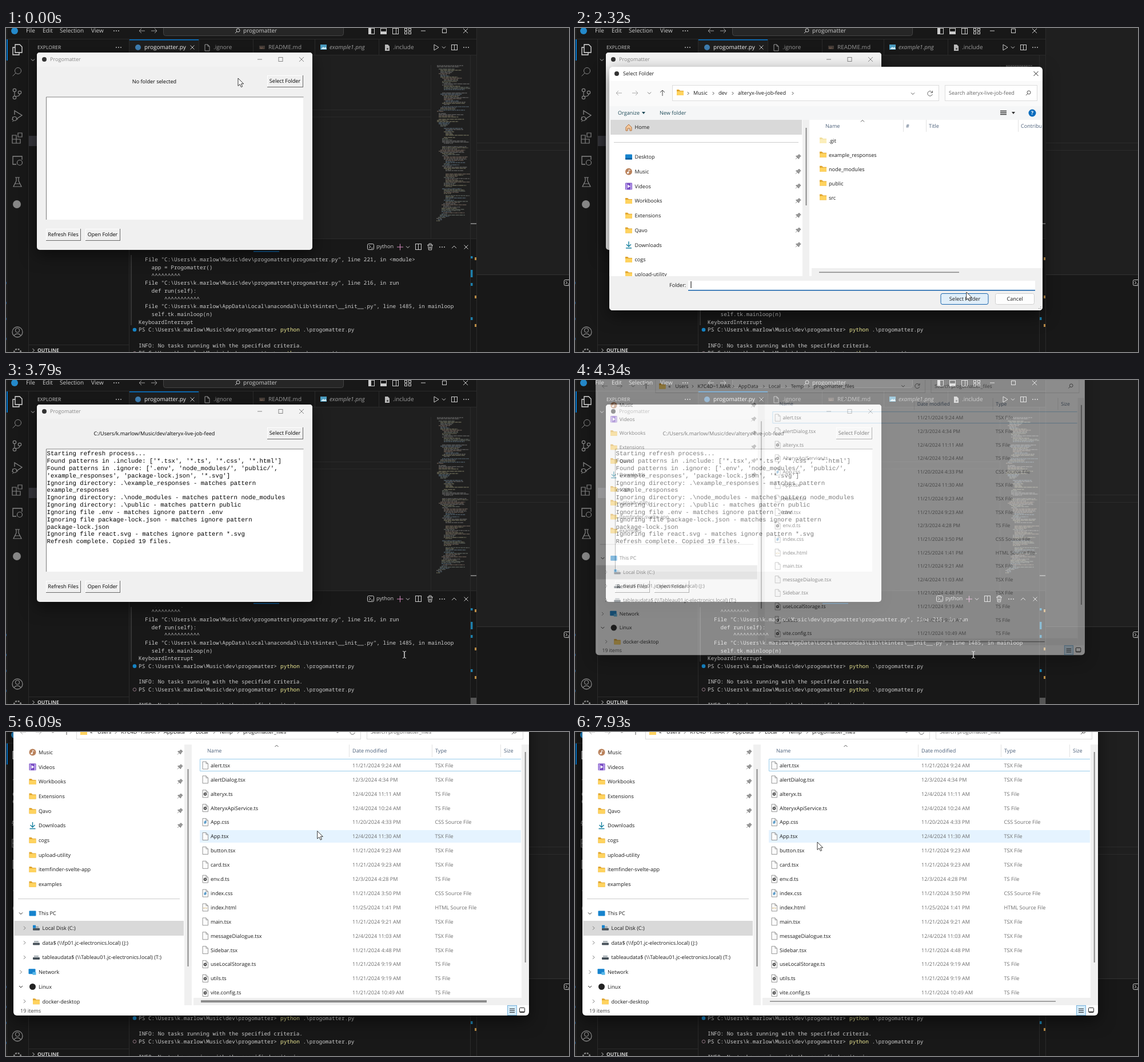
Animation, 985 px wide and 568 px high, one loop 8 s. Source, as an HTML page:

```html
<!DOCTYPE html>
<html lang="en">
<head>
<meta charset="utf-8">
<title>Progomatter</title>
<style>
html, body { margin: 0; width: 100%; height: 100%; overflow: hidden; background: #181818; }
svg { display: block; width: 985px; height: 568px; font: 9.1px "Open Sans", "Noto Sans", sans-serif; }
text { white-space: pre; text-rendering: geometricPrecision; }
.code { font-size: 10px; }
.term { font: 9.39px "Noto Sans Mono", monospace; }
.log { font: 10.7px "Liberation Mono", monospace; }
.shadow { filter: drop-shadow(0 9px 14px rgba(0, 0, 0, .5)); }
</style>
</head>
<body>
<svg id="stage" viewBox="0 0 985 568"></svg>
<script>
const stage = document.getElementById('stage');

// ---------- drawing helpers ----------
const esc = s => s.replace(/&/g, '&amp;').replace(/</g, '&lt;');
const rect = (x, y, w, h, fill, more = '') =>
  `<rect x="${x}" y="${y}" width="${w}" height="${h}" fill="${fill}" ${more}/>`;
const text = (x, y, s, fill = '#1b1b1b', more = '') =>
  `<text x="${x}" y="${y + 3.3}" fill="${fill}" ${more}>${esc(s)}</text>`;
const path = (d, stroke, width = 1, fill = 'none') =>
  `<path d="${d}" stroke="${stroke}" stroke-width="${width}" fill="${fill}"/>`;
const circle = (x, y, r, fill, more = '') => `<circle cx="${x}" cy="${y}" r="${r}" fill="${fill}" ${more}/>`;
const group = (id, body, more = '') => `<g id="${id}" ${more}>${body}</g>`;
const box = (x, y, w, h, stroke, fill = 'none', r = 0) =>
  rect(x + .5, y + .5, w - 1, h - 1, fill, `stroke="${stroke}" rx="${r}"`);
const middle = 'text-anchor="middle"';

const chevrons = { right: [-1.5, -3, 3, 3, -3, 3], down: [-3, -1.5, 3, 3, 3, -3], up: [-3, 1.5, 3, -3, 3, 3] };
const chevron = (x, y, dir, color = '#555', k = 1) => {
  const [a, b, c, d, e, f] = chevrons[dir].map(v => v * k);
  return path(`M${x + a} ${y + b}l${c} ${d}l${e} ${f}`, color);
};
const cross = (x, y, color, r = 4) => path(`M${x - r} ${y - r}l${2 * r} ${2 * r}m0 ${-2 * r}l${-2 * r} ${2 * r}`, color);
const dots = (x, y, color) => [-4, 0, 4].map(d => circle(x + d, y, .9, color)).join('');
const lens = (x, y, color, r = 3) =>
  circle(x + 1, y - 1, r, 'none', `stroke="${color}"`) + path(`M${x + 1 - r * .7} ${y - 1 + r * .7}l${-r} ${r}`, color);
const arrow = (x, y, angle, color) =>
  `<g transform="translate(${x} ${y}) rotate(${angle})">${path('M5 0H-5M-1 -4L-5 0L-1 4', color)}</g>`;
const windowButtons = (x, y, gap, color) =>
  path(`M${x - 4} ${y}h8`, color) + box(x + gap - 4, y - 4, 8, 8, color) + cross(x + 2 * gap, y, color);
const refresh = (x, y) => path(`M${x + 4} ${y - 2}A4.3 4.3 0 1 0 ${x + 4.3} ${y + 1}M${x + 4.5} ${y - 5}v3.4h-3.4`, '#666');
const pin = (x, y) => path(`M${x - 4} ${y + 4}l3 -3m-2.5 -2.5l5 5l1 -2.5l2.5 -2.5l-3 -3l-2.5 2.5z`, '#777', .8, '#999');
const folder = (x, y, pale) =>
  path(`M${x - 6} ${y + 5}v-10h4l2 2h6v8z`, 'none', 0, pale ? '#f1dfa0' : '#e0a52f') +
  rect(x - 6, y - 2, 12, 7, pale ? '#fbeebb' : '#ffd35f', 'rx="1"');
const screen = (x, y) => rect(x - 6, y - 4.5, 12, 9, '#1683cd', 'rx="1"');
const drive = (x, y) => rect(x - 6, y, 12, 4, '#48525a', 'rx="1"') + rect(x - 4, y - 3, 8, 2, '#9aa4aa');

const placeIcons = {
  Desktop: (x, y) => screen(x, y) + rect(x - 6, y + 2, 12, 2.5, '#0b5c9c'),
  Music: (x, y) => circle(x, y, 6, '#b9825c') + circle(x - 1.5, y + 2, 1.7, '#fff') + path(`M${x} ${y + 2}v-5l3 1`, '#fff'),
  Videos: (x, y) => rect(x - 6, y - 6, 12, 12, '#7a4fc4', 'rx="1"') +
    path(`M${x - 4} ${y - 5}v11M${x + 4} ${y - 5}v11`, '#d9c8ff', 1.4) + path(`M${x - 2} ${y - 3}l5 3l-5 3z`, 'none', 0, '#fff'),
  Downloads: (x, y) => path(`M${x} ${y - 6}v9m-4 -4l4 4l4 -4M${x - 5} ${y + 5.5}h10`, '#16809f', 1.4),
};
const places = (names, x, top, pinX, pinned) => names.map((name, i) => {
  const y = top + 25.7 * i;
  return (placeIcons[name] || folder)(x, y) + text(x + 10.5, y, name) + (i < pinned ? pin(pinX, y) : '');
}).join('');
const quickAccess = ['Desktop', 'Music', 'Videos', 'Workbooks', 'Extensions', 'Qavo', 'Downloads', 'cogs',
  'upload-utility', 'itemfinder-svelte-app', 'examples'];

// ---------- code editor in the background ----------
let seed = 7;
const random = () => (seed = (seed * 16807) % 2147483647) / 2147483647;

function minimap() {
  const colors = ['#8e9a8e', '#7f9bb0', '#a58f80', '#9a9a9a', '#b0ad8a'];
  let out = '', depth = 0;
  for (let i = 0; i < 137; i++) {
    depth = Math.max(0, Math.min(5, depth + Math.round(random() * 2.4 - 1.2)));
    const x = (i > 120 ? 750 : 754) + depth * 3;
    const width = Math.min(812 - x, (i > 120 ? 5 : 9) + random() * 40);
    const dash = `stroke-dasharray="${2 + random() * 5 | 0} .8 ${2 + random() * 8 | 0} 1" opacity=".7"`;
    const color = colors[random() * 5 | 0];
    if (random() > .1) out += `<path d="M${x} ${66 + 2 * i}h${width}" stroke="${color}" ${dash}/>`;
  }
  return out;
}

function activityBar() {
  const g = '#868686';
  return path('M16 29h8l4 4v10h-12zM16 34h-4v13h11v-4', '#e0e0e0', 1.3) +
    lens(20, 76, g, 5.5) +
    [[15, 109], [15, 122], [24, 113]].map(([x, y]) => circle(x, y, 2.7, 'none', `stroke="${g}" stroke-width="1.2"`)).join('') +
    path('M15 112v7M24 116q0 4 -8 4', g, 1.2) +
    path('M15 152v-7l13 8l-9 6', g, 1.3) + circle(15, 159, 3.5, 'none', `stroke="${g}" stroke-width="1.2"`) +
    path('M11 156l2 1m-3 3h2m-1 4l2 -1M19 160h2', g) +
    path('M11 188h7v14h-7zm0 7h14v7h-14M21 184h7v7h-7z', g, 1.2) +
    path('M18 239h-6v-14h16v6M14 239h4', g, 1.3) + circle(24, 236, 4.5, 'none', `stroke="${g}" stroke-width="1.2"`) +
    path('M16 262h8m-6 0v6l-5 10h14l-5 -10v-6M15 273h10', g, 1.2) +
    circle(19, 309, 7, g) +
    circle(20, 533, 9, 'none', `stroke="${g}" stroke-width="1.3"`) + circle(20, 530, 3.5, 'none', `stroke="${g}" stroke-width="1.2"`) +
    path('M14 539q6 -6 12 0', g, 1.2) +
    circle(20, 569, 6, 'none', `stroke="${g}" stroke-width="2.5" stroke-dasharray="3 1.7"`);
}

function editor() {
  const light = '#cccccc', dim = '#9d9d9d', edge = '#2b2b2b';
  const prompt = 'PS C:\\Users\\k.marlow\\Music\\dev\\progomatter> ';
  const script = '  File "C:\\Users\\k.marlow\\Music\\dev\\progomatter\\progomatter.py", line ';
  const info = 'INFO: No tasks running with the specified criteria.';
  const lines = [script + '221, in <module>', '    app = Progomatter()', '    ^^^^^^^^^', script + '216, in run',
    '    def run(self):', '        ^^^^^^^^^^^',
    '  File "C:\\Users\\k.marlow\\AppData\\Local\\anaconda3\\Lib\\tkinter\\__init__.py", line 1485, in mainloop',
    '    self.tk.mainloop(n)', 'KeyboardInterrupt', prompt, '', info, prompt, '', info];
  const terminal = lines.map((s, i) => {
    const y = 406 + 13.68 * i;
    return text(232, y, s, light) + (s === prompt ? text(480, y, 'python', '#f0ec96') + text(519.4, y, '.\\progomatter.py', light) : '');
  }).join('') + circle(225, 529, 3.3, '#1583c4') + circle(225, 570, 2.8, 'none', 'stroke="#8d7480"') + rect(218.5, 390, 1, 131, '#555');

  const tab = (x, name, color, more) => text(x, 34, name, color, more);
  return rect(0, 0, 985, 568, '#181818') +
    rect(824, 0, 161, 432, '#1f1f1f') + path('M824 201.5h161M824 214.5h161', '#2b2b2b') + path('M824 432.5h161', '#333') +
    box(976, 441, 12, 11, light, 'none', 2) + path('M979 444l3 2.5l-3 2.5M983 449h3', light) +
    [447, 482, 510, 545].map(y => rect(0, y - 2, 1, 4, '#174a80')).join('') +
    rect(216, 47, 607, 322, '#1f1f1f') + path('M216 143.5h527M216 156h527', '#2a2a2a') + rect(743, 65, 1, 304, '#292929') +
    path('M0 19.5h823M39.5 20v548M215.5 20v548M216 47.5h607M216 369.5h607M1.5 0v568M823.5 0v568M812.5 47v521', edge) +
    rect(1, 20, 2, 37, '#0078d4') + activityBar() + minimap() + rect(813, 342, 10, 2, '#777') +
    `<g class="code">` + circle(15, 5, 6, '#2489ca') +
    text(35, 5, 'File', light) + text(64, 5, 'Edit', light) + text(94, 5, 'Selection', light) + text(149, 5, 'View', light) +
    dots(193, 5, light) + arrow(238, 5, 0, dim) + arrow(259, 5, 180, dim) +
    box(275, -12, 316, 26, '#444', '#262626', 4) + lens(405, 5, light) + text(415, 5, 'progomatter', light) +
    box(634, 0, 11, 11, light) + rect(634, 0, 5, 11, light) + box(655, 0, 11, 11, light) + rect(655, 6, 11, 5, light) +
    box(676, 0, 11, 11, light) + path('M682.5 0v11', light) +
    [[697, 0], [704, 0], [697, 6], [704, 6]].map(([x, y]) => box(x, y, 5, 5, light)).join('') +
    windowButtons(730, 5, 37, light) +
    rect(216, 20, 121, 28, '#1f1f1f') + rect(216, 20, 121, 1.5, '#0078d4') +
    path('M337.5 20v27M432.5 20v27M540.5 20v27M652.5 20v27', edge) +
    circle(231, 34, 5, '#3f80b5') + tab(242, 'progomatter.py', '#fff') + cross(326, 34, light, 3.5) +
    path('M348 29h5l3 3v8h-8zM353 29v3h3', dim) + tab(363, '.ignore', dim) +
    rect(443, 31, 10, 6, '#443c37') + text(448, 34, 'M↓', '#a07b67', `${middle} font-size="5"`) + tab(459, 'README.md', dim) +
    rect(550, 29, 11, 9, '#4b9cc0') + path('M551 37l4 -4l2 2l2 -2l2 4z', 'none', 0, '#d9eef5') +
    tab(566, 'example1.png', dim, 'font-style="italic"') +
    path('M663 29h5l3 3v8h-8z', 'none', 0, '#b9b9b9') + rect(666, 35, 3, 3, '#555') + tab(677, '.include', dim) +
    path('M749 29l8 5l-8 5z', light) + chevron(766, 34, 'down', light) + box(779, 29, 11, 10, light) + path('M784.5 29v10', light) + dots(805, 34, light) +
    text(55, 34, 'EXPLORER', light, 'font-size="8.6"') + dots(197, 34, light) + chevron(47, 56, 'down', light) +
    rect(40, 189, 14, 18, '#37373d') + path('M40 555.5h176', edge) + chevron(48, 565, 'right', light) +
    text(55, 565, 'OUTLINE', light, 'font-size="8.6" font-weight="700"') +
    box(632, 378, 12, 11, light, 'none', 2) + path('M635 381l3 2.5l-3 2.5M639 386h3', light) +
    text(648, 383, 'python', light, 'font-size="9.2"') + path('M684 384h11M689.5 378.5v11', '#d68ac0') + chevron(703, 384, 'down', light) +
    box(716, 378, 11, 11, light) + path('M721.5 378v11', light) + path('M737 380.5h10M740 380v-2h4v2M738.5 381l1 8h5l1 -8M741 383v4M743 383v4', light) +
    dots(763, 384, light) + chevron(784, 384, 'up', light, 1.3) + cross(805, 384, light, 3.5) + rect(433, 391, 45, 1.5, '#0f6cb5') + '</g>' +
    `<clipPath id="termClip">${rect(216, 398, 597, 170, '#000')}</clipPath><g clip-path="url(#termClip)">` +
    group('terminal', terminal, 'class="term"') + '</g>' +
    [[400, 4], [424, 13], [447, 5], [507, 5]].map(([y, h]) => rect(813, y, 3.5, h, '#1d7fab')).join('') +
    [402, 469, 519].map(y => rect(820, y, 3, 5, '#b98a45')).join('') + rect(813, 557, 10, 11, '#555', 'id="slider"');
}

// ---------- application window ----------
function appWindow() {
  const button = (x, y, w, label) => rect(x, y, w, 21, '#696969') + rect(x, y, w - 1, 20, '#fff') +
    rect(x + 1, y + 1, w - 2, 19, '#f0f0f0') + text(x + w / 2 - .5, y + 10, label, '#000', middle);
  const log = ['Starting refresh process...', "Found patterns in .include: ['*.tsx', '*.ts', '*.css', '*.html']",
    "Found patterns in .ignore: ['.env', 'node_modules/', 'public/',", "'example_responses', 'package-lock.json', '*.svg']",
    'Ignoring directory: .\\example_responses - matches pattern', 'example_responses',
    'Ignoring directory: .\\node_modules - matches pattern node_modules', 'Ignoring directory: .\\public - matches pattern public',
    'Ignoring file .env - matches ignore pattern .env', 'Ignoring file package-lock.json - matches ignore pattern',
    'package-lock.json', 'Ignoring file react.svg - matches ignore pattern *.svg', 'Refresh complete. Copied 19 files.'];
  return rect(54, 43, 482, 346, '#f0f0f0', 'rx="5" class="shadow"') + path('M54 68v-20q0 -5 5 -5h472q5 0 5 5v20z', 'none', 0, '#f3f3f3') +
    circle(67, 55, 4, '#333') + group('appTitle', text(77, 55, 'Progomatter') + windowButtons(444, 55, 36.5, '#1b1b1b')) +
    text(259.5, 94, 'No folder selected', '#000', middle + ' id="folderLabel"') + button(457, 83, 63, 'Select Folder') +
    rect(70, 120, 450, 216, '#fff') + path('M70.5 336v-215h450', '#7a7a7a') +
    group('log', log.map((s, i) => text(71.5, 129 + 12.83 * i, s, '#000')).join(''), 'class="log"') +
    button(70, 352, 61, 'Refresh Files') + button(139, 352, 61, 'Open Folder');
}

// ---------- folder picker ----------
function dialog() {
  const files = ['.git', 'example_responses', 'node_modules', 'public', 'src'];
  const crumbs = [[207, 'Music'], [251, 'dev'], [285, 'alteryx-live-job-feed']];
  return rect(60, 68, 758, 427, '#fff', 'rx="6" class="shadow"') + rect(60, 93, 758, 44, '#fafafa') + rect(60, 137, 758, 24, '#f5f6f7') +
    circle(73, 80, 4, '#333') + text(84, 80, 'Select Folder') + cross(806.5, 80, '#222') +
    arrow(77, 114, 0, '#aaa') + arrow(105, 114, 180, '#aaa') + chevron(130, 114, 'down', '#777') + arrow(153, 114, 90, '#444') +
    box(170, 100, 467, 28, '#dcdcdc', '#fff') + folder(184, 113) + [198, 242, 276, 381].map(x => chevron(x, 114.5, 'right', '#444', .8)).join('') +
    crumbs.map(([x, s]) => text(x, 114, s)).join('') + chevron(591, 115, 'down') + refresh(621, 115) +
    box(647, 100, 162, 28, '#dcdcdc', '#fff') + text(654, 114, 'Search alteryx-live-job-feed', '#666') + lens(793, 114, '#555') +
    text(75, 149, 'Organize', '#1e4a58') + path('M117 147h6l-3 4z', 'none', 0, '#1e4a58') + text(148, 149, 'New folder', '#1e4a58') +
    path('M744 145.5h11M744 148.5h11M744 151.5h11', '#333', 1.4) + path('M764 147h6l-3 4z', 'none', 0, '#333') +
    circle(800, 149, 6.5, '#0a6cbd') + text(800, 149, '?', '#fff', middle + ' font-weight="700"') +
    rect(62, 161, 335, 26, '#d9d9d9') + path('M89 174l5 -5l5 5v6h-3v-4h-4v4h-3z', '#b3703c', 1, '#f3c89c') + text(104.5, 174, 'Home') +
    path('M68 200.5h323', '#ccc') + `<clipPath id="navClip">${rect(60, 161, 340, 274, '#000')}</clipPath>` +
    `<g clip-path="url(#navClip)">${places(quickAccess.slice(0, 9), 94, 226, 390, 7)}</g>` +
    rect(398, 161, 12, 274, '#f0f0f0') + rect(403.5, 175, 2, 136, '#8a8a8a') +
    rect(421, 0, 397, 24, '#e5f3ff', 'id="pickHover"') +
    group('pickList', files.map((s, i) => folder(434, 197 + 24.85 * i, !i) + text(444, 198 + 24.85 * i, s)).join('')) +
    path('M574.5 161v21M614.5 161v21M775.5 161v21', '#e2e2e2') + chevron(503, 163, 'up') +
    [[438, 'Name'], [579, '#'], [619, 'Title'], [780, 'Contribu']].map(([x, s]) => text(x, 172, s, '#4c607a')).join('') +
    rect(414, 421, 404, 14, '#f0f0f0') + rect(427, 427.5, 245, 1.6, '#8a8a8a') +
    path('M60 435h758v54q0 6 -6 6h-746q-6 0 -6 -6z', 'none', 0, '#f0f0f0') + text(165, 451, 'Folder:') +
    rect(198, 443, 607, 17, '#fff') + rect(198, 459, 607, 1.6, '#1b66ad') + rect(202.5, 444, 1, 12, '#000', 'id="caret"') +
    rect(640, 465.5, 83, 19, '#fdfdfd', 'id="okButton" rx="3" stroke="#1b66ad"') + text(682, 475, 'Select Folder', undefined, middle) +
    box(735, 465, 69, 20, '#d0d0d0', '#fdfdfd', 3) + text(769.5, 475, 'Cancel', undefined, middle) +
    [[815, 492], [815, 489], [812, 492]].map(([x, y]) => rect(x - 1, y - 1, 1.5, 1.5, '#aaa')).join('');
}

// ---------- file explorer ----------
function explorer() {
  const files = `alert.tsx|11/21/2024 9:24 AM
alertDialog.tsx|12/3/2024 4:34 PM
alteryx.ts|12/4/2024 11:11 AM
AlteryxApiService.ts|12/4/2024 10:24 AM
App.css|11/20/2024 4:33 PM
App.tsx|12/4/2024 11:30 AM
button.tsx|11/21/2024 9:23 AM
card.tsx|11/21/2024 9:23 AM
env.d.ts|12/3/2024 4:28 PM
index.css|11/21/2024 3:50 PM
index.html|11/25/2024 1:41 PM
main.tsx|11/21/2024 9:21 AM
messageDialogue.tsx|12/4/2024 11:03 AM
Sidebar.tsx|11/21/2024 4:48 PM
useLocalStorage.ts|11/21/2024 9:19 AM
utils.ts|11/21/2024 9:19 AM
vite.config.ts|11/21/2024 10:49 AM`.split('\n');
  const types = { tsx: 'TSX File', ts: 'TS File', css: 'CSS Source File', html: 'HTML Source File' };
  const marks = { ts: y => circle(348.5, y + .5, 2.8, '#444') + circle(348.5, y + .5, 1, '#fff'),
    css: y => text(348.5, y, '#', '#2c7fb8', middle + ' font-weight="700" font-size="8"'),
    html: y => text(348.5, y, '<>', '#b98a2e', middle + ' font-size="6.5"'), tsx: () => '' };
  const rows = files.map((row, i) => {
    const [name, date] = row.split('|'), ext = name.split('.').pop(), y = 58.5 + 24.9 * i;
    return path(`M344 ${y - 6.5}h6l3.5 3.5v9.5h-9.5zM350 ${y - 6.5}v3.5h3.5`, '#8c8c8c', .9, '#fcfcfc') + marks[ext](y) +
      text(358, y, name) + text(606, y, date, '#6d6d6d') + text(750.5, y, types[ext], '#6d6d6d');
  }).join('');

  // name, depth, chevron direction, icon
  const tree = [['This PC', 0, 'down', screen], ['Local Disk (C:)', 1, 'right', (x, y) => drive(x, y) + rect(x - 6, y - 5, 5, 5, '#1683cd')],
    ['data$ (\\\\fp01.jc-electronics.local) (J:)', 1, 'right', drive], ['tableaudata$ (\\\\Tableau01.jc-electronics.local) (T:)', 1, 'right', drive],
    ['Network', 0, 'right', (x, y) => screen(x - 1, y - 1) + rect(x, y, 6, 5, '#59b7e8')],
    ['Linux', 0, 'down', (x, y) => circle(x, y, 5.5, '#222')], ['docker-desktop', 1, 'right', folder]];
  const nodes = tree.map(([name, depth, dir, icon], i) => {
    const y = 318 + 25.7 * i, x = 26 + 6.5 * depth;
    return chevron(x, y, dir, dir === 'down' ? '#222' : '#777') + icon(x + 20.5, y) + text(x + 31, y, name);
  }).join('');

  const crumbs = [[160, 'Users'], [201, 'K7C4D~1.MAR'], [276, 'AppData'], [332, 'Local'], [373, 'Temp'], [415, 'progomatter_files']];
  return rect(13, -80, 902, 577, '#fff', 'rx="6" class="shadow"') +
    arrow(30, 0, 0, '#aaa') + arrow(57, 0, 180, '#aaa') + chevron(82, 0, 'down', '#777') + arrow(106, 0, 90, '#555') +
    box(123, -15, 498, 28, '#dcdcdc', '#fff') + folder(136, 0) + text(147, 0, '«') +
    crumbs.map(([x, s], i) => text(x, 0, s) + (i ? chevron(x - 9, .5, 'right', '#555', .8) : '')).join('') +
    chevron(580, 0, 'down') + refresh(606, 0) + box(631, -15, 274, 28, '#dcdcdc', '#fff') + text(638, 0, 'Search progomatter_files', '#666') + lens(889, 0, '#555') +
    places(quickAccess.slice(1), 46.5, 35.5, 304, 6) + path('M21 292.5h283', '#ccc') + rect(14, 331, 297, 26, '#d9d9d9') + nodes +
    rect(312, 22, 13, 457, '#f0f0f0') + rect(317.5, 65, 2, 346, '#8a8a8a') +
    [[352, 'Name'], [606, 'Date modified'], [751, 'Type'], [871, 'Size']].map(([x, s]) => text(x, 33, s, '#4c607a')).join('') +
    path('M600.5 22v22M745.5 22v22M865.5 22v22', '#e2e2e2') + chevron(473.5, 24.5, 'up') +
    rect(339, 0, 562, 22, '#e5f3ff', 'id="fileHover"') + path('M901 47.5h-561.5v21h561.5', '#99cdec') + rows +
    rect(902, 22, 13, 457, '#f0f0f0') + rect(907.7, 35, 2, 369, '#8a8a8a') +
    rect(328, 466, 574, 13, '#f0f0f0') + path('M341 472.3h500', '#8a8a8a', 1.6).replace('<path', '<path id="hThumb"') +
    text(25, 488.5, '19 items', '#444') + box(877, 479, 17, 18, '#79b4dc', '#d3eafa') +
    path('M881 485.5h9M881 488.5h9M881 491.5h9', '#222') + box(898, 483, 10, 9, '#222', '#fff', 1) + path('M899 490.5h8', '#222');
}

stage.innerHTML = editor() + group('app', appWindow()) + group('dialog', dialog()) + group('explorer', explorer()) +
  group('pointer', path('M0 0V13.5L3.2 10.7 5.5 15.6 7.7 14.6 5.5 9.8H9.7Z', '#222', .9, '#fff')) +
  group('ibeam', path('M694 475.5q3 0 3 2v8q0 2 -3 2M700 475.5q-3 0 -3 2v8q0 2 3 2', '#ddd'));

// ---------- motion ----------
const el = id => document.getElementById(id);
const show = (id, on) => el(id).setAttribute('visibility', on ? 'inherit' : 'hidden');
const set = (id, name, value) => el(id).setAttribute(name, value);

// Advances from 0 to 1 in n hard steps, the first at a and the last at b.
const steps = (t, a, b, n) => t < a ? 0 : t >= b ? 1 : (Math.floor((t - a) / (b - a) * (n - 1) + 1e-6) + 1) / n;
const ease = p => p * p * p * (10 - 15 * p + 6 * p * p);
const easeOut = p => 1 - (1 - p) ** 3;

const moves = [[60, 130, 2, 468, 102], [1710, 2390, 11, 695, 480], [5680, 6430, 12, 465, 11], [7240, 7930, 11, 424, 193]];
function pointerAt(t) {
  let x = 406, y = 88;
  for (const [a, b, n, toX, toY] of moves) {
    const p = ease(steps(t, a, b, n));
    x += (toX - x) * p;
    y += (toY - y) * p;
  }
  return [x, y];
}

function pose(id, opacity, scale, cx, cy) {
  show(id, opacity > 0);
  set(id, 'opacity', opacity);
  set(id, 'transform', `translate(${cx} ${cy}) scale(${scale}) translate(${-cx} ${-cy})`);
}

function hover(id, index, count, top, pitch, on) {
  show(id, on && index >= 0 && index < count);
  set(id, 'y', top + pitch * index);
}

function render(t) {
  const [x, y] = pointerAt(t);
  const between = (a, b) => t >= a && t < b;

  const opening = easeOut(steps(t, 460, 730, 5));
  const closing = steps(t, 3090, 3270, 4);
  const dialogOpacity = Math.max(0, Math.min(opening, 1 - 1.1 * closing));
  pose('dialog', dialogOpacity, closing ? 1 - .05 * closing : .9 + .1 * opening, 439, 281.5);
  show('pickList', t >= 800);
  show('caret', !between(1440, 1970) && !between(2390, 2720) && t < 2980);
  hover('pickHover', Math.round((y - 197.5) / 24.85), 5, 185.5, 24.85, between(1710, 2390));
  set('okButton', 'fill', between(2300, 3270) ? '#e0eef9' : '#fdfdfd');

  const done = t >= 3650;
  set('appTitle', 'opacity', between(3090, 3720) ? 1 : .5);
  el('folderLabel').textContent = done ? 'C:/Users/k.marlow/Music/dev/alteryx-live-job-feed' : 'No folder selected';
  show('log', done);
  set('terminal', 'transform', `translate(0 ${t >= 3270 ? -27.36 : 0})`);
  show('slider', between(3270, 4880));

  const launch = easeOut(steps(t, 4340, 4610, 5));
  pose('explorer', launch, .9 + .1 * launch, 464, 208);
  hover('fileHover', Math.round((y - 58.5) / 24.9), 17, 47.5, 24.9, t >= 5680);
  set('hThumb', 'stroke-width', between(5680, 6640) ? 4 : 1.6);

  const overTerminal = between(3150, 4410);
  show('pointer', !overTerminal);
  show('ibeam', overTerminal);
  set('pointer', 'transform', `translate(${x} ${y})`);
}

function frame() {
  render(performance.now() % 8000);
  requestAnimationFrame(frame);
}
frame();
</script>
</body>
</html>
```
